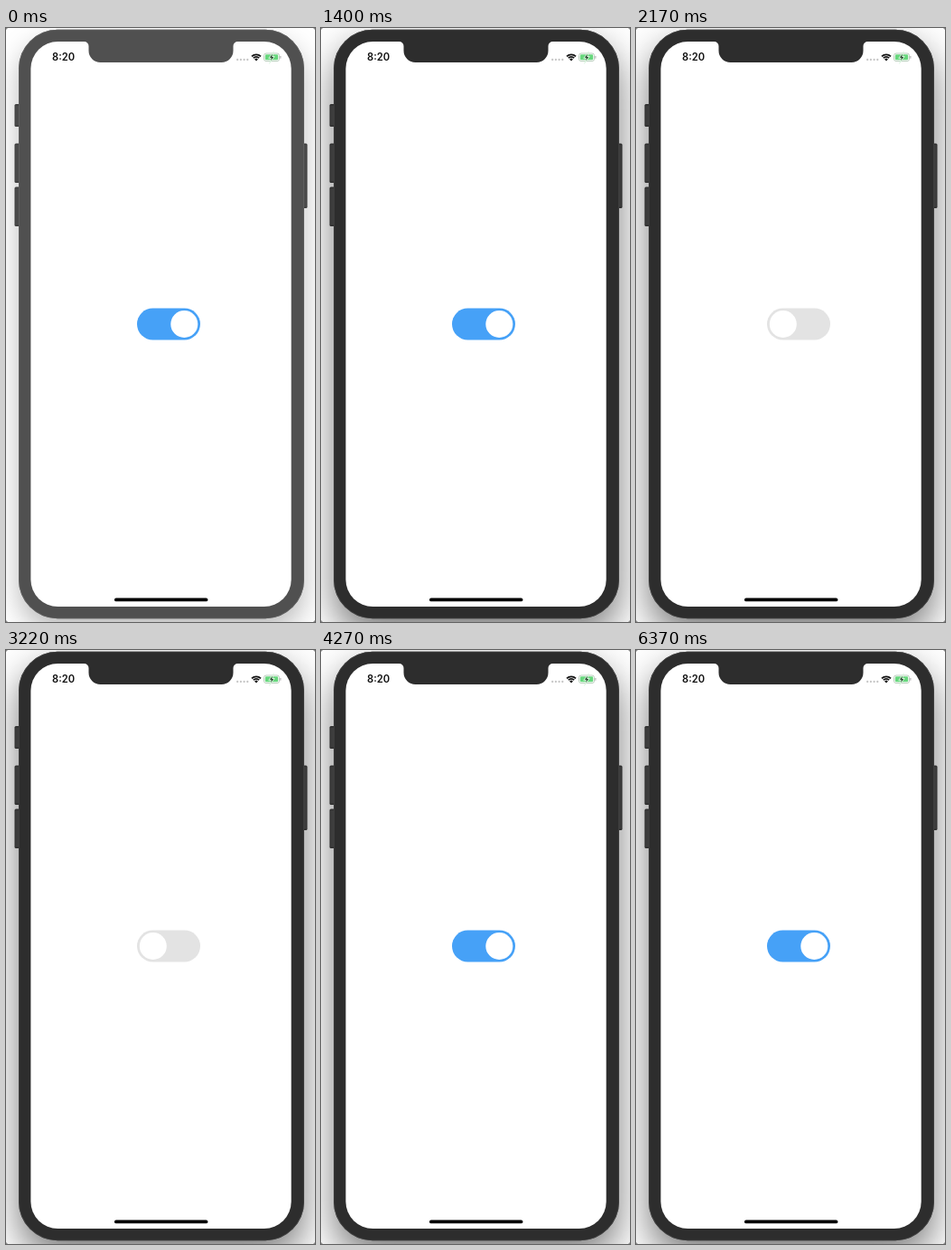
These frames come from a looping animation (342 by 656 pixels, 7.21 s). An HTML page with a canvas:

```html
<!DOCTYPE html>
<html lang="en">
<head>
<meta charset="utf-8">
<title>Phone toggle</title>
<style>
  html, body { margin: 0; width: 100%; height: 100%; overflow: hidden; background: #fff; }
  canvas { position: absolute; left: 0; top: 0; width: 342px; height: 656px; }
  #clock {
    position: absolute; left: 51px; top: 25px;
    font: 600 11.2px/14px Inter, Roboto, sans-serif; color: #111;
  }
</style>
</head>
<body>
<canvas id="stage"></canvas>
<div id="clock">8:20</div>
<script>
const W = 342, H = 656, LOOP = 7210, STEP = 70;
const FOCUS_AT = 1400, OFF_AT = 1400, ON_AT = 3815, SLIDE = 350;
const canvas = document.getElementById('stage');
const ctx = canvas.getContext('2d');
const dpr = window.devicePixelRatio || 1;
canvas.width = W * dpr;
canvas.height = H * dpr;
ctx.scale(dpr, dpr);

const IDLE = { body: '#505050', rim: '#626262', button: '#4b4b4b', shade: '#3f3f3f', alpha: 0.27, blur: 30, drop: 14 };
const ACTIVE = { body: '#2d2d2d', rim: '#434343', button: '#3d3d3d', shade: '#303030', alpha: 0.52, blur: 40, drop: 18 };
const ON = [70, 161, 247], OFF = [227, 227, 227];

const clamp = v => Math.max(0, Math.min(1, v));
const mix = (a, b, p) => a + (b - a) * p;

function box(x, y, w, h, r, fill) {
  ctx.beginPath();
  ctx.roundRect(x, y, w, h, r);
  ctx.fillStyle = fill;
  ctx.fill();
}

function disc(x, y, r, fill) {
  ctx.beginPath();
  ctx.arc(x, y, r, 0, Math.PI * 2);
  ctx.fillStyle = fill;
  ctx.fill();
}

function button(x, y, h, look) {
  box(x, y, 6, h, 1.5, look.shade);
  box(x + 1, y + 1.5, 4, h - 3, 1, look.button);
}

function notch(fill) {
  const left = 91.5, right = 251.5, top = 15, bottom = 38, lip = 5, r = 13;
  ctx.beginPath();
  ctx.moveTo(left - lip, top - 1);
  ctx.lineTo(left - lip, top);
  ctx.arcTo(left, top, left, top + lip, lip);
  ctx.arcTo(left, bottom, left + r, bottom, r);
  ctx.arcTo(right, bottom, right, bottom - r, r);
  ctx.arcTo(right, top, right + lip, top, lip);
  ctx.lineTo(right + lip, top - 1);
  ctx.fillStyle = fill;
  ctx.fill();
}

function phone(look) {
  ctx.save();
  ctx.shadowColor = `rgba(0,0,0,${look.alpha})`;
  ctx.shadowBlur = look.blur * dpr;
  ctx.shadowOffsetY = look.drop * dpr;
  box(14, 1.8, 316, 650.4, 43, look.rim);
  ctx.restore();

  button(9.5, 84, 25, look);
  button(9.5, 127.5, 43.5, look);
  button(9.5, 175.5, 43.5, look);
  button(327.5, 127.5, 71.5, look);

  box(14, 1.8, 316, 650.4, 43, look.rim);
  box(14.8, 2.6, 314.4, 648.8, 42.2, look.body);
  box(27.4, 15, 288.3, 624, 30, '#fff');
  notch(look.body);
}

function wifi(x, y) {
  const from = -Math.PI * 0.75, to = -Math.PI * 0.25;
  ctx.strokeStyle = '#111';
  ctx.lineWidth = 1.7;
  for (const r of [4.5, 7.1]) {
    ctx.beginPath();
    ctx.arc(x, y, r, from, to);
    ctx.stroke();
  }
  ctx.beginPath();
  ctx.moveTo(x, y);
  ctx.arc(x, y, 2.7, from, to);
  ctx.fillStyle = '#111';
  ctx.fill();
}

function battery() {
  ctx.beginPath();
  ctx.roundRect(285.5, 28, 17, 8.6, 2.5);
  ctx.strokeStyle = '#b4c9b7';
  ctx.lineWidth = 0.9;
  ctx.stroke();
  box(286.8, 29.3, 14.4, 6, 1.4, '#67d77d');
  box(303.3, 30.8, 1.1, 3, 0.6, '#b5b5b5');

  ctx.beginPath();
  ctx.moveTo(294.9, 28.8);
  ctx.lineTo(291.9, 32.8);
  ctx.lineTo(293.9, 32.8);
  ctx.lineTo(293.1, 36);
  ctx.lineTo(296.1, 31.9);
  ctx.lineTo(294.2, 31.9);
  ctx.closePath();
  ctx.strokeStyle = '#d5f3da';
  ctx.lineWidth = 1.8;
  ctx.stroke();
  ctx.fillStyle = '#16351d';
  ctx.fill();
}

function statusBar() {
  for (let i = 0; i < 4; i++) disc(256.2 + i * 3.7, 35, 1.15, '#c6c6c6');
  wifi(277, 36.4);
  battery();
}

function toggle(on) {
  const rgb = OFF.map((v, i) => Math.round(mix(v, ON[i], on)));
  box(145, 309.5, 70, 35, 17.5, `rgb(${rgb})`);
  disc(mix(162.8, 197.3, on), 327, 15, '#fff');
}

// rounded window corners
function corners() {
  ctx.fillStyle = '#8a8a8a';
  for (const x of [0, W]) {
    for (const y of [0, H]) {
      ctx.beginPath();
      ctx.moveTo(x, y);
      ctx.lineTo(x + (x ? -2 : 2), y);
      ctx.lineTo(x, y + (y ? -2 : 2));
      ctx.fill();
    }
  }
}

function draw(time) {
  const t = Math.floor((time % LOOP) / STEP) * STEP;
  const on = 1 - clamp((t - OFF_AT) / SLIDE) + clamp((t - ON_AT) / SLIDE);
  ctx.fillStyle = '#fff';
  ctx.fillRect(0, 0, W, H);
  phone(t < FOCUS_AT ? IDLE : ACTIVE);
  statusBar();
  toggle(on);
  box(120, 629.6, 103.4, 3.7, 1.85, '#000');
  corners();
}

const start = performance.now();
function tick() {
  draw(performance.now() - start);
  requestAnimationFrame(tick);
}
tick();
</script>
</body>
</html>
```
